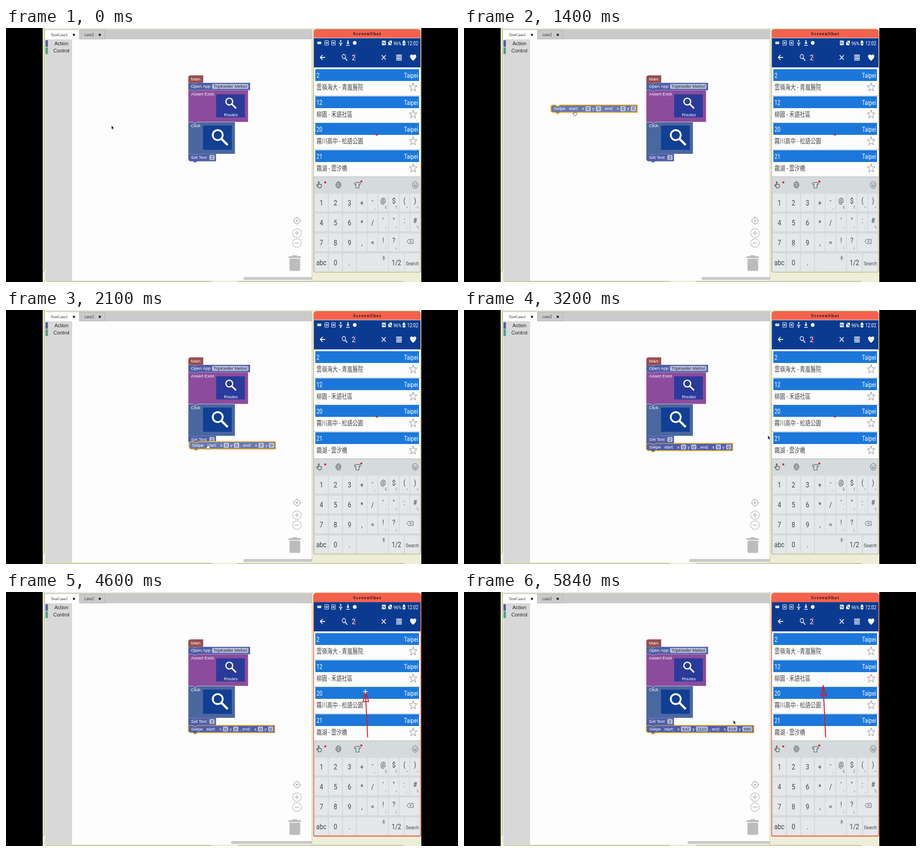
Write an HTML page with a canvas that moves like this. It is 998x561 px and loops after 5.87 s.

```html
<!DOCTYPE html>
<html lang="en">
<head>
<meta charset="utf-8">
<title>Block test editor</title>
<style>
html, body { margin: 0; width: 100%; height: 100%; overflow: hidden; background: #000; }
canvas { display: block; }
</style>
</head>
<body>
<canvas id="stage" width="998" height="561"></canvas>
<script>
const c = document.getElementById('stage').getContext('2d');
const LOOP = 5870;
const SQUEEZE = 0.81; // the phone screen is shown with a narrower aspect
const SANS = '"Liberation Sans", Arial, sans-serif';
const SERIF = '"Liberation Serif", Times, serif';
const PHONE = 'Roboto, "Noto Sans CJK TC", "Noto Sans CJK", sans-serif';
const BLUE = '#4f5ea6', PAGE = '#eeeed8', YELLOW = '#f6b62c', RED = '#e3131d';

// Times of the hard changes
const OPEN = 450, GRAB = 1170, DROP = 2420, ENTER = 3700, PULL = 3850, RELEASE = 4900;

function rect(x, y, w, h, fill, r = 0) {
  c.fillStyle = fill;
  c.beginPath();
  c.roundRect(x, y, w, h, r);
  c.fill();
}

function frame(x, y, w, h, color, r = 0, lw = 1) {
  c.strokeStyle = color;
  c.lineWidth = lw;
  c.beginPath();
  c.roundRect(x, y, w, h, r);
  c.stroke();
}

function text(s, x, y, font, fill, align = 'left') {
  c.font = font;
  c.fillStyle = fill;
  c.textAlign = align;
  c.fillText(s, x, y);
}

function line(points, color, lw = 1, close = false) {
  c.strokeStyle = color;
  c.lineWidth = lw;
  c.beginPath();
  points.forEach(([x, y]) => c.lineTo(x, y));
  if (close) c.closePath();
  c.stroke();
}

function disc(x, y, r, fill) {
  c.fillStyle = fill;
  c.beginPath();
  c.arc(x, y, r, 0, 7);
  c.fill();
}

function ring(x, y, r, color, lw = 1) {
  c.strokeStyle = color;
  c.lineWidth = lw;
  c.beginPath();
  c.arc(x, y, r, 0, 7);
  c.stroke();
}

function glyph(path, x, y, fill, stroke, lw = 1) {
  c.save();
  c.translate(x, y);
  const p = new Path2D(path);
  if (fill) { c.fillStyle = fill; c.fill(p); }
  if (stroke) { c.strokeStyle = stroke; c.lineWidth = lw; c.stroke(p); }
  c.restore();
}

function squeezed(x, y, draw) {
  c.save();
  c.translate(x, y);
  c.scale(SQUEEZE, 1);
  draw();
  c.restore();
}

const phoneText = (s, x, y, size, fill, align) =>
  squeezed(x, y, () => text(s, 0, 0, `${size}px ${PHONE}`, fill, align));

function magnifier(x, y, r) {
  ring(x, y, r, '#fff', r * 0.36);
  line([[x + r * 0.75, y + r * 0.75], [x + r * 2, y + r * 2]], '#fff', r * 0.45);
}

// Editor blocks. An item that starts with "[" is an input field.
const FONT = `9.6px ${SANS}`;

function layout(items) {
  c.font = FONT;
  let x = 6, before = null;
  const parts = items.map(item => {
    const field = item[0] === '[', s = field ? item.slice(1) : item;
    if (before !== null) x += field || before ? 3.2 : 7.5;
    const w = field ? Math.max(9, c.measureText(s).width + 6.2) : c.measureText(s).width;
    const part = { s, field, x, w };
    x += w;
    before = field;
    return part;
  });
  return { parts, width: x + 3.2 };
}

function block(x, y, color, items, o = {}) {
  const { parts, width } = layout(items);
  const w = o.w || width, h = o.h || 16.4;
  const top = o.top ?? 5, bottom = o.bottom ?? 5;
  c.beginPath();
  c.moveTo(x, y + top);
  if (top) c.arcTo(x, y, x + top, y, top);
  if (!o.hat) {
    c.lineTo(x + 10, y);
    c.lineTo(x + 14, y + 2.7);
    c.lineTo(x + 16, y + 2.7);
    c.lineTo(x + 20, y);
  }
  c.lineTo(x + w, y);
  c.lineTo(x + w, y + h);
  c.lineTo(x + 20, y + h);
  c.lineTo(x + 16, y + h + 2.7);
  c.lineTo(x + 14, y + h + 2.7);
  c.lineTo(x + 10, y + h);
  c.lineTo(x + bottom, y + h);
  if (bottom) c.arcTo(x, y + h, x, y + h - bottom, bottom);
  c.closePath();
  c.fillStyle = color;
  c.fill();
  c.strokeStyle = o.selected ? YELLOW : 'rgba(255,255,255,.22)';
  c.lineWidth = o.selected ? 2 : 0.7;
  c.stroke();
  for (const p of parts) {
    if (p.field) rect(x + p.x, y + 2.6, p.w, 11, 'rgba(255,255,255,.6)', 2.5);
    text(p.s, x + p.x + (p.field ? 3.1 : 0), y + 11.2, FONT, p.field ? '#22263c' : '#fff');
  }
}

const swipe = (a, b, d, e) =>
  ['Swipe', 'start:', 'x', '[' + a, 'y', '[' + b, ', end:', 'x', '[' + d, 'y', '[' + e];

function program(t) {
  if (t >= DROP) {
    const values = t < RELEASE ? [0, 0, 0, 0] : [542, 1110, 518, 690];
    block(402.5, 294.4, BLUE, swipe(...values), { top: 0, selected: true });
  }
  block(402.5, 278, BLUE, ['Set Text ', '[2'], { top: 0, bottom: t < DROP ? 5 : 0 });
  block(402.5, 208, '#4a679f', ['Click'], { w: 103, h: 70, top: 0, bottom: 0 });
  block(402.5, 137.6, '#8d4b9d', ['Assert Exist'], { w: 132, h: 70, top: 0, bottom: 0 });
  block(402.5, 121, BLUE, ['Open App', '[TripKeeler Melovi'], { w: 136.5, top: 0, bottom: 0 });
  block(402.5, 104.5, '#984d4e', ['Main'], { w: 33, bottom: 0, hat: true });
  rect(464, 146.5, 63.5, 51, '#2a3b9b');
  magnifier(493, 162.5, 7.5);
  text('Routes', 496.5, 195, FONT, '#fff', 'center');
  rect(435, 215.5, 63.5, 53.5, '#113f94');
  magnifier(467.5, 236.5, 11);
}

function flyout() {
  rect(146, 25, 212.5, 533, '#d5d5d5');
  block(157, 31.5, '#4a679f', ['Click'], { w: 103, h: 70 });
  [
    ['Sleep(s)', '[0'],
    swipe(0, 0, 0, 0),
    ['Set Text ', '['],
    ['Android Keycode', '['],
    ['Common Action', '[home ▾'],
    ['Open App', '[Apps Name']
  ].forEach((items, i) => block(157, 119.7 + 34.3 * i, BLUE, items));
}

function workspaceControls(t) {
  const gray = '#c3c3c3';
  ring(642.5, 425.5, 6.5, gray, 2);
  disc(642.5, 425.5, 2.6, gray);
  for (const [dx, dy] of [[0, 1], [0, -1], [1, 0], [-1, 0]])
    line([[642.5 + dx * 6, 425.5 + dy * 6], [642.5 + dx * 9, 425.5 + dy * 9]], gray, 2);
  for (const y of [453, 475]) {
    ring(642.5, y, 9.6, gray, 1.5);
    line([[637.5, y], [647.5, y]], gray, 2);
  }
  line([[642.5, 448], [642.5, 458]], gray, 2);
  rect(624, 504, 27, 4, '#bcbcbc', 1);
  rect(632, 502, 11, 3, '#bcbcbc', 1);
  rect(626, 509.5, 23.5, 27, '#bcbcbc', 2);
  const left = t < DROP ? 524.5 : t < RELEASE ? 497 : 493.5;
  rect(left, 550, 675 - left, 6.5, '#c9c9c9', [3, 0, 0, 3]);
}

function editor(t) {
  const open = t >= OPEN && t < GRAB;
  rect(81, 0, 836, 561, PAGE);
  line([[81, 538], [83, 538], [84.5, 535], [84.5, 0]], '#aa9859');
  rect(87, 2.5, 588, 22.5, '#cacaca');
  rect(87, 4.5, 75, 21, '#fff');
  frame(162, 4.5, 56.5, 20, '#b4b4b4');
  text('TestCase1', 99, 18, `9.2px ${SERIF}`, '#222');
  text('case2', 173, 18, `9.6px ${SERIF}`, '#333');
  for (const x of [150, 207])
    for (const d of [-2, 2]) line([[x - 2, 15 - d], [x + 2, 15 + d]], '#111', 1.8);
  rect(146, 25, 529, 533, '#fdfdfd');
  rect(87, 25, 59, 533, '#d8d8d8');
  rect(87, 27, open ? 59 : 5.5, 14.5, BLUE);
  rect(87, 43, 5.5, 14.5, '#4fa283');
  text('Action', 107, 38, `11px ${SANS}`, open ? '#fff' : '#222');
  text('Control', 104.5, 54, `11px ${SANS}`, '#222');
  line([[675.5, 0], [675.5, 558]], '#c9c9a6');
  line([[88, 559.5], [455, 559.5]], '#a5a56c');
  line([[512, 559.5], [878, 559.5]], '#a5a56c');
  program(t);
  workspaceControls(t);
  if (open) flyout();
}

function statusBar() {
  const white = '#fff';
  rect(680, 22.5, 235, 64.5, '#0b3b91');
  rect(687.5, 30, 8.5, 5.5, white, 1);
  line([[689, 32], [695, 32]], '#0b3b91', 0.8);
  for (const x of [708, 723]) {
    frame(x - 4, 28, 8, 10, white, 1, 1.1);
    line([[x - 2.5, 33], [x + 2.5, 33]], white, 1.6);
    line([[x, 30], [x, 36]], white, 0.8);
  }
  glyph('M0-6V5M-3-1V1L0 3L3 1V-1M-1.5-4L0-6L1.5-4', 739, 33, null, white, 1.2);
  disc(739, 38, 1.5, white);
  glyph('M-1-6H1V-1H3.5L0 3L-3.5-1H-1ZM-4 4.5H4V6H-4Z', 755, 33, white);
  disc(770, 33, 4.2, white);
  rect(830, 28, 8.5, 10, white, 1);
  line([[832, 36], [832, 30], [836, 36], [836, 30]], '#0b3b91', 1);
  glyph('M-1-5H4V5H-4V-2Z', 848, 33, white);
  line([[844, 28], [853, 38]], '#0b3b91', 1.2);
  phoneText('96%', 855.5, 37.5, 11.5, white);
  rect(876, 29, 5.5, 9.5, white, 1);
  rect(877.5, 27.5, 2.5, 2, white);
  glyph('M1-3L-1.5 1H0L-.5 3L2 0H.2Z', 878.7, 33.8, '#0b3b91');
  phoneText('12:02', 886, 38, 12, white);

  glyph('M5.5 0H-5M0-5.5L-5 0L0 5.5', 699, 65, null, white, 1.8);
  squeezed(746, 63, () => magnifier(0, 0, 4.6));
  phoneText('2', 763.5, 71, 17, white);
  line([[771, 56], [771, 74]], '#d43a5c', 1.2);
  glyph('M-4.5-5L4.5 5M4.5-5L-4.5 5', 834, 65, null, white, 1.7);
  for (let i = 0; i < 4; i++) rect(861.5, 59 + i * 3.5, 12.5, 2, white);
  glyph('M0 7C-10-1-7-7-3.5-7C-1.5-7-.5-6 0-5C.5-6 1.5-7 3.5-7C7-7 10-1 0 7Z', 899, 65.5, white);
}

function star(x, y) {
  const points = Array.from({ length: 10 }, (_, i) => {
    const a = i * Math.PI / 5, r = i % 2 ? 4.2 : 10;
    return [x + Math.sin(a) * r * 0.9, y - Math.cos(a) * r];
  });
  line(points, '#808080', 1, true);
}

function routes() {
  rect(680, 87, 235, 243, '#fdfdfd');
  [
    ['2', '雲嶺海大 - 青嵐醫院'],
    ['12', '柳園 - 禾語社區'],
    ['20', '霧川高中 - 松語公園'],
    ['21', '霜湖 - 雲汐橋']
  ].forEach(([number, name], i) => {
    const y = Math.round(91 + 59.5 * i);
    rect(683, y, 229, 26, '#1b78da');
    phoneText(number, 685.5, y + 19, 14.5, '#fff');
    phoneText('Taipei', 910, y + 19, 14.5, '#fff', 'right');
    phoneText(name, 685.5, y + 45, 14.5, '#444');
    star(899, y + 40);
    line([[680, y + 58.5], [915, y + 58.5]], '#b4b4b4');
  });
}

function key(x, y, w, main = '', sub = '', size = 17) {
  rect(x, y, w, 39, '#e4e8e9', 2);
  phoneText(main, x + w / 2, y + (sub ? 21 : 26), size, '#3c464c', 'center');
  phoneText(sub, x + w - 5, y + 33, 9, '#7b8589', 'center');
}

function keyboard() {
  const ink = '#4c565b', faint = '#8a9397';
  rect(680, 329, 235, 209, '#d5dadc');
  glyph('M-2 6L-6 1L-4 0L-2 2V-6H0V-1L5 0V4L3 7H-1Z', 691.5, 346, null, ink, 1.3);
  disc(705, 341, 2.3, RED);
  squeezed(734, 346.5, () => {
    ring(0, 0, 7, ink);
    c.beginPath();
    c.ellipse(0, 0, 3, 7, 0, 0, 7);
    c.stroke();
    line([[-7, 0], [7, 0]], ink);
    line([[-6, -3.5], [6, -3.5]], ink, 0.8);
    line([[-6, 3.5], [6, 3.5]], ink, 0.8);
  });
  glyph('M-2-6Q0-3 2-6L7-3L5 0L3.5-1V7H-3.5V-1L-5 0L-7-3Z', 776, 346.5, null, ink, 1.1);
  disc(784.5, 339, 2.3, RED);
  squeezed(903.5, 346.5, () => {
    ring(0, 0, 7.5, ink);
    disc(-2.7, -2, 1, ink);
    disc(2.7, -2, 1, ink);
    glyph('M-4 1.5Q0 7 4 1.5Z', 0, 0, null, ink);
  });
  [
    ['1', '2', '3', '+', '-_', '@&', '$€', '(<', ')>'],
    ['4', '5', '6', '*', '/', "'‹", '"«', ':;', '#%'],
    ['7', '8', '9', ',', '=', '!¡', '?¿']
  ].forEach((row, j) => row.forEach(([main, sub], i) => {
    const wide = i < 3;
    key(wide ? 682 + 31 * i : 775 + 23.5 * (i - 3), 366 + 44 * j, wide ? 28.5 : 21.5, main, sub);
  }));
  key(869, 454, 45);
  glyph('M-7 0L-3-4.5H7V4.5H-3ZM-1-2L3.5 2M3.5-2L-1 2', 892, 471.5, null, ink);
  key(682, 498, 28.5, 'abc');
  key(713, 498, 28.5, '0');
  key(744, 498, 28.5, '.');
  key(775, 498, 68.5);
  rect(832.3, 503, 3.4, 7, faint, 2);
  glyph('M-3.3-1Q-3 3 0 3Q3 3 3.3-1M0 3V5.5', 834, 508.5, null, faint, 0.9);
  key(845.5, 498, 33, '1/2');
  key(881, 498, 32.5, 'Search', '', 11.6);
}

function phone(t) {
  const active = t >= ENTER;
  const edge = active ? '#e8604a' : '#b3a970';
  rect(679, 2.5, 237, 537, active ? '#f4624e' : PAGE, [6, 6, 3, 3]);
  rect(680, 3, 235, 18.5, '#f4624e', [5, 5, 0, 0]);
  c.letterSpacing = '1px';
  text('ScreenShot', 797.5, 16, `bold 11px ${SERIF}`, '#331512', 'center');
  c.letterSpacing = '0px';
  statusBar();
  routes();
  keyboard();
  frame(679.2, 2.5, 236.6, 537, edge, [6, 6, 3, 3], active ? 1.6 : 1.2);
  if (t < PULL) rect(816.5, 234.5, 4.5, 3, RED, 1);
}

// Each key is [time, x, y]; motion eases between neighbours.
const POINTER = [
  [0, 233, 215], [500, 128, 38], [720, 128, 39], [1080, 198, 163], [1130, 198, 163],
  [2100, 446, 303], [DROP, 446, 304], [3200, 671, 277], [3780, 798, 321], [PULL, 798, 321],
  [4800, 793, 207], [5000, 793, 207], [5840, 595, 283]
];
const CARRIED = [[GRAB, 156.5, 150], [2140, 405.5, 291.5]];

function along(keys, t) {
  const i = keys.findIndex(k => k[0] > t);
  if (i < 0) return keys[keys.length - 1].slice(1);
  if (i === 0) return keys[0].slice(1);
  const [t0, x0, y0] = keys[i - 1], [t1, x1, y1] = keys[i];
  const p = (t - t0) / (t1 - t0), e = p * p * (3 - 2 * p);
  return [x0 + (x1 - x0) * e, y0 + (y1 - y0) * e];
}

function arrow(x, y) {
  const x0 = 798.5, y0 = 321, len = Math.hypot(x - x0, y - y0);
  if (len < 2) return;
  const a = Math.atan2(y - y0, x - x0), head = Math.min(23, len);
  const barb = d => [x - head * Math.cos(a + d), y - head * Math.sin(a + d)];
  line([[x0, y0], [x, y]], RED, 2);
  line([[x, y], barb(0.27), barb(-0.27)], RED, 1.8, true);
}

function pointer(t, x, y) {
  if (t >= GRAB && t < DROP) {
    glyph('M-3 3L-4-1L-2-1V-3H0L1-3.5L2-3L4-2V2L2 4H-2Z', x, y, '#fff', '#333', 0.9);
  } else if (t >= ENTER && t < 5150) {
    line([[x - 5, y], [x + 5, y]], '#fff', 2);
    line([[x, y - 5], [x, y + 5]], '#fff', 2);
  } else {
    glyph('M0 0V8.5L1.8 7L3 10L4.4 9.4L3.2 6.4H5.6Z', x, y, '#111', '#fff', 0.5);
  }
}

function draw(now) {
  const t = now % LOOP;
  const [x, y] = along(POINTER, t);
  c.fillStyle = '#000';
  c.fillRect(0, 0, 998, 561);
  editor(t);
  phone(t);
  if (t >= GRAB && t < DROP) {
    const [bx, by] = along(CARRIED, t);
    block(bx, by, '#6b78ae', swipe(0, 0, 0, 0), { selected: true });
  }
  if (t >= PULL) arrow(...(t < 4800 ? [x, y] : [793, 207]));
  pointer(t, x, y);
}

let start;
function tick(now) {
  start ??= now;
  draw(now - start);
  requestAnimationFrame(tick);
}
requestAnimationFrame(tick);
</script>
</body>
</html>
```
